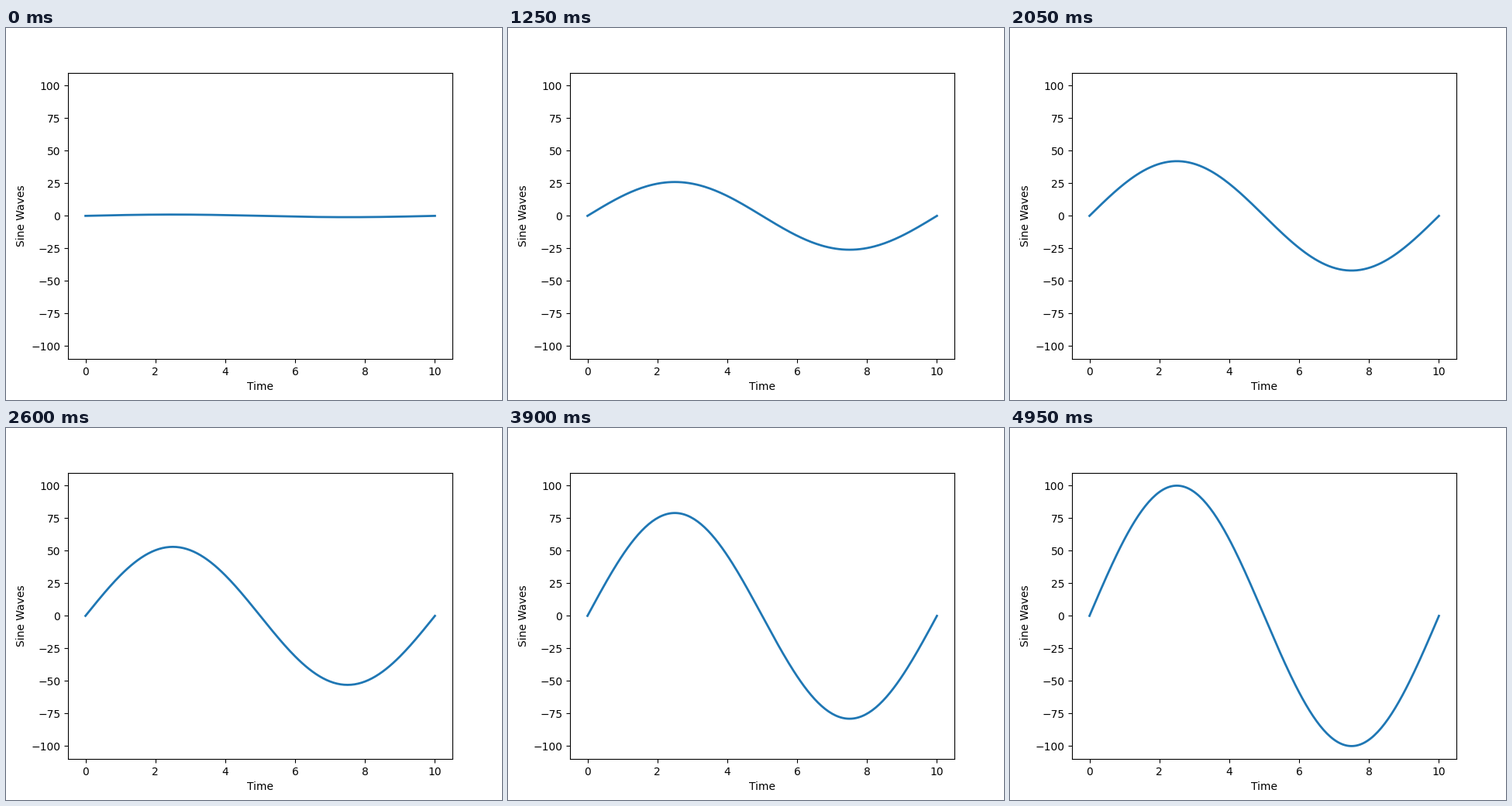
Write a matplotlib script that moves like this. It is 640 px wide and 480 px high and loops after 5000 ms.

```python
import numpy as np
import matplotlib.pyplot as plt
from matplotlib.animation import FuncAnimation

FRAMES = 100
INTERVAL = 50  # ms

plt.rcParams["font.family"] = "DejaVu Sans"

fig, ax = plt.subplots(figsize=(6.4, 4.8), dpi=100)
ax.set_xlim(-0.5, 10.5)
ax.set_ylim(-110, 110)
ax.set_xlabel("Time")
ax.set_ylabel("Sine Waves")

t = np.linspace(0, 10, 201)
wave = np.sin(2 * np.pi * t / 10)
line, = ax.plot(t, wave, color="#1f77b4", lw=2)


def update(frame):
    """Amplitude grows by one unit per frame, from 1 to 100."""
    line.set_ydata((frame + 1) * wave)
    return line,


anim = FuncAnimation(fig, update, frames=FRAMES, interval=INTERVAL,
                     repeat=True, repeat_delay=0)
plt.show()
```
